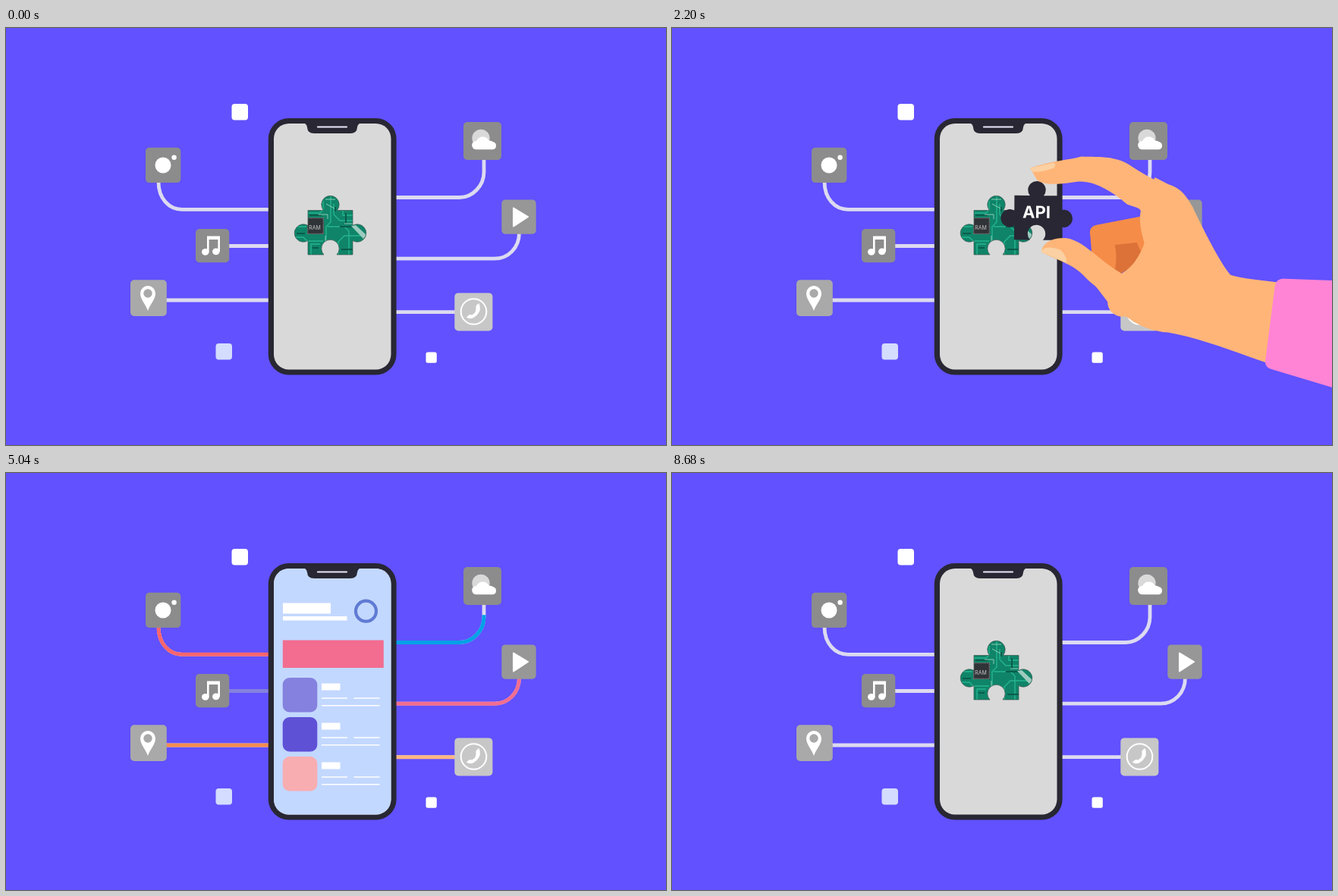
Recreate the animation shown at these times as an HTML page. Size 870 by 550 pixels, loop 8.72 s.

```html
<!DOCTYPE html>
<html lang="en">
<head>
<meta charset="utf-8">
<title>Phone with API piece</title>
<style>
html, body { margin: 0; width: 100%; height: 100%; overflow: hidden; background: #6151ff; }
svg { display: block; width: 870px; height: 550px; }
text { font-family: Inter, "Liberation Sans", sans-serif; text-anchor: middle; }
</style>
</head>
<body>
<svg viewBox="0 0 870 550">
  <defs>
    <path id="shape" d="M398 240.5H418.5A11.7 11.7 0 1 1 436.5 240.5H457V260.5A11.7 11.7 0 1 1 457 280.5V299H436A11.7 11.7 0 1 0 419 299H398V280.5A11.7 11.7 0 1 1 398 260.5Z"/>
    <clipPath id="shapeClip"><use href="#shape"/></clipPath>
    <clipPath id="screenClip"><rect x="353" y="126" width="154.5" height="324.5" rx="20"/></clipPath>
  </defs>
  <rect width="870" height="550" fill="#6151ff"/>
  <rect x="297.5" y="100" width="21.5" height="21.5" rx="4" fill="#fff"/>
  <rect x="276.5" y="416" width="21.5" height="21.5" rx="4" fill="#d4dcff"/>
  <rect x="553.5" y="427.5" width="14.3" height="14.3" rx="2.5" fill="#fff"/>
  <g id="links" fill="none"></g>
  <g id="icons"></g>
  <g fill="#fff">
    <circle cx="207" cy="181" r="10.5"/><circle cx="221.6" cy="170.8" r="3.2"/>
    <ellipse cx="262.8" cy="295.3" rx="4.8" ry="4.4"/><ellipse cx="276.8" cy="294.8" rx="4.8" ry="4.4"/>
    <path d="M265 295V274.5H282V295H279.4V279H267.6V295Z"/>
    <path fill-rule="evenodd" d="M187 373C184 364 177 358 177 350A10 10 0 0 1 197 350C197 358 190 364 187 373ZM181.3 350a5.7 5.7 0 0 0 11.4 0a5.7 5.7 0 0 0-11.4 0Z"/>
    <circle cx="626" cy="145.3" r="11.6" opacity=".67"/>
    <path d="M619.5 160.3a5.7 5.7 0 0 1 .7-11.4a9 9 0 0 1 16.3-.3a7 7 0 0 1 5.3 1.5a5.2 5.2 0 0 1 0 10.2Z"/>
    <path d="M669 237.5L688 249L669 261.5Z" stroke="#fff" stroke-width="2" stroke-linejoin="round"/>
    <circle cx="616.5" cy="374" r="16.8" fill="none" stroke="#fff" stroke-width="2"/>
    <path d="M607 381.5Q611 376.5 614 378.5Q620 376 619.5 369Q618.5 366 623.5 363Q627.5 372 620.5 379Q613 386 607 381.5Z"/>
  </g>

  <rect x="345.8" y="119" width="168.8" height="338.5" rx="27" fill="#282733"/>
  <rect x="353" y="126" width="154.5" height="324.5" rx="20" fill="#d9d9d9"/>

  <g id="board">
    <g clip-path="url(#shapeClip)" fill="none">
      <rect x="378" y="220" width="100" height="82" fill="#0f8468"/>
      <path stroke="#25b58f" stroke-width="1.4" d="M398 244H414L418 240V228M422 300V262L428 256V222M432 232V246L440 254H458M380 276H392L397 281H418M402 299V285H414M424 262H446L452 268V299M438 299V282L446 274H475M444 240V247H458M384 262H396"/>
      <path stroke="#0a5c4b" stroke-width="2" d="M400 247H416M434 242V236M440 262H456M404 290H412M442 292H458M383 271H394M448 244V258"/>
      <path stroke="#a9ddca" stroke-width=".8" d="M421 226H434M422 232L433 238M412 246H424V252M421 274V284M446 258H457"/>
      <path fill="#9dcbbf" d="M455 261L461 260L475 273L471 278Z"/>
      <rect x="397" y="250" width="22" height="22" fill="#303337"/>
      <rect x="397.7" y="250.7" width="20.6" height="20.6" stroke="#999" stroke-width="1.3" stroke-dasharray="1 1.2"/>
      <rect x="399.5" y="252.5" width="17" height="17" fill="#303337"/>
      <text x="407" y="266" font-size="7" textLength="" fill="#c5c5c5">RAM</text>
    </g>
    <use href="#shape" fill="none" stroke="#3c5550" stroke-width=".7"/>
  </g>

  <g id="ui" clip-path="url(#screenClip)">
    <rect x="353" y="126" width="155" height="325" fill="#c3d8ff"/>
    <rect id="title" x="365" y="171.5" height="14" fill="#fff"/>
    <rect id="subtitle" x="365" y="189" height="5.5" fill="#fff"/>
    <circle id="ring" cx="474.5" cy="182.2" r="13.5" fill="none" stroke="#607bd3" stroke-width="4.2" pathLength="1" transform="rotate(-90 474.5 182.2)"/>
    <rect id="banner" y="220.5" height="36.5" fill="#f26d90"/>
    <g id="rows"></g>
  </g>
  <path d="M392 125H468Q463.500 126.500 463 131Q462.500 139 454 139H406Q397.500 139 397 131Q396.500 126.500 392 125Z" fill="#282733"/>
  <path d="M411 130.5H449" stroke="#e9e8fb" stroke-width="2.2" stroke-linecap="round"/>

  <g id="piece">
    <use href="#shape" fill="#282733"/>
    <text x="427.3" y="270" font-size="22" font-weight="700" fill="#fff">API</text>
  </g>

  <g id="hand" fill="#ffb578">
    <path fill="#f58c48" d="M502 325Q500 314 511 312L580 301V345L537 379L504 364Z"/>
    <path fill="#dc7238" d="M534 339L563 337L568 349L556 369L537 379L533 372Q537 355 534 339Z"/>
    <path d="M572 288C566 304 568 318 573 338C566 358 552 374 537 379L505 390L522 414C521 424 530 434 541 434C548 430 558 452 600 457C640 465 690 487 735 504L752 397C728 392 705 391 685 384C672 368 650 320 638 292C628 272 618 265 608 262L590 252Z"/>
    <path id="index"/>
    <path id="thumb"/>
    <path id="indexNail" fill="#fbd0a2"/>
    <path id="thumbNail" fill="#fbd0a2"/>
    <path fill="#ff84d5" d="M743 401Q745 390 757 391.500L970 407V590L737 511Q725 508 727 498Z"/>
  </g>
</svg>
<script>
const LOOP = 8720;
const $ = id => document.getElementById(id);
const clamp = v => Math.min(1, Math.max(0, v));
const linear = (t, a, b) => clamp((t - a) / (b - a));
const ease = (t, a, b) => { const u = linear(t, a, b); return u * u * (3 - 2 * u); };
const lerp = (a, b, s) => a + (b - a) * s;
const set = (el, attrs) => { for (const k in attrs) el.setAttribute(k, attrs[k]); };
const add = (parent, tag, attrs) => {
  const el = document.createElementNS("http://www.w3.org/2000/svg", tag);
  set(el, attrs);
  return parent.appendChild(el);
};

// Blends two paths that share the same commands.
const mix = (from, to, s) => {
  const goal = to.match(/[\d.]+/g);
  let i = 0;
  return from.replace(/[\d.]+/g, n => lerp(+n, +goal[i++], s).toFixed(2));
};

// Finger poses: closed around the piece, then open.
const poses = {
  index: [
    "M426 234C450 226 477 225 494 221C520 223 541 221 562 238C580 250 597 261 610 263L600 310L570 302C572 290 565 292 552 286C535 270 510 253 489 254C465 257 441 258 434 249Z",
    "M447 196C465 196 490 200 516 200C540 206 563 219 580 235C592 246 606 250 612 263L600 310L568 308C572 298 574 289 568 286C548 272 530 250 502 230C482 229 462 222 453 217Z"],
  thumb: [
    "M437 343C441 331 456 326 471 328C493 332 512 358 540 376L560 400L537 430L522 414C518 400 502 390 495 382C480 362 455 356 437 345Z",
    "M429 364C434 350 447 344 463 346C488 351 508 366 537 379L560 400L537 430L522 414C510 402 495 400 478 391C462 379 440 374 429 366Z"],
  indexNail: [
    "M426 234L457 228Q462 231 457 235Q442 240 429 239Z",
    "M447 196L478 198Q482 202 478 206Q462 206 449 203Z"],
  thumbNail: [
    "M437 343Q444 336 462 343Q470 350 470 361Q454 353 437 345Z",
    "M429 364Q437 355 458 362Q464 367 459 376Q445 373 429 367Z"]
};

// Paths run from the phone outwards; draw and wipe are start times and durations.
const apps = [
  { d: "M346 239.300H232C215 239.300 201 225 201 203", box: [184, 157.8, 46.3], grey: "#8c8c8c", color: "#ff5964", line: "#f9656c", draw: [4440, 560], wipe: 7205 },
  { d: "M346 287.500H293", box: [250, 265, 44.3], grey: "#8c8c8c", color: "#8581de", line: "#8581de", draw: [4500, 400], wipe: 7215 },
  { d: "M346 359H211", box: [164, 332.2, 47.8], grey: "#a9a9a9", color: "#f68f48", line: "#f58c4e", draw: [4460, 500], wipe: 7067 },
  { d: "M514 223.500H598C615 223.500 630 208 630 190V173", box: [603, 124, 50], grey: "#8c8c8c", color: "#00b9ff", line: "#00a1e6", draw: [4500, 667], wipe: 7127 },
  { d: "M514 304.200H644C662 304.200 676.500 290 676.500 270", box: [653.3, 226.4, 45.4], grey: "#979797", color: "#f26d90", line: "#f26d90", draw: [4440, 580], wipe: 7115 },
  { d: "M514 374.700H592", box: [591.3, 349.4, 50.1], grey: "#c7c7c7", color: "#ffb777", line: "#fcb783", draw: [4500, 450], wipe: 7113 }
];

for (const app of apps) {
  const [x, y, size] = app.box;
  const square = fill => add($("icons"), "rect", { x, y, width: size, height: size, rx: 5, fill });
  add($("links"), "path", { d: app.d, stroke: "#dcdaf0", "stroke-width": 4.8 });
  app.link = add($("links"), "path", { d: app.d, stroke: app.line, "stroke-width": 4.9, pathLength: 1 });
  square(app.grey);
  app.tint = square(app.color);
}

const rows = ["#8581de", "#5f51d6", "#f8adb1"].map(fill => {
  const row = add($("rows"), "g", {});
  add(row, "rect", { x: 364.7, y: 270, width: 45.6, height: 45.4, rx: 9, fill });
  add(row, "path", { d: "M416 277.500H440.500V286.500H416Z", fill: "#fff" });
  add(row, "path", { d: "M416 297H450M458.500 297H492.500M416 306.800H492.500", stroke: "#fff", "stroke-width": 1.6 });
  return row;
});

function drawHand(t) {
  const enter = (1 - linear(t, 0, 1200)) ** 2;
  const carry = ease(t, 1233, 2500);
  const open = ease(t, 2600, 3150);
  const leave = 390 * ease(t, 3120, 3850);
  const x = lerp(378 + 115 * enter, 0, carry);
  const y = lerp(-138 - 34 * enter, 0, carry);
  const turn = lerp(1, -2.5, carry);

  set($("piece"), {
    transform: `translate(${x} ${y}) rotate(${turn + 2.5} 427.5 265)`,
    opacity: 1 - linear(t, 3780, 3980)
  });
  set($("hand"), {
    transform: `translate(${x - 5 * (1 - open)} ${y - 30 + 17 * open + leave}) rotate(${turn * (1 - open)} 432.5 295)`,
    visibility: t < 3860 ? "visible" : "hidden"
  });
  for (const id in poses) set($(id), { d: mix(...poses[id], open) });
}

function drawScreen(t) {
  const grow = ease(t, 4130, 4700);
  set($("board"), { opacity: t < 2500 ? 1 : linear(t, 8150, 8440) });
  set($("ui"), { opacity: linear(t, 4050, 4300) * (1 - linear(t, 7820, 8200)) });
  set($("title"), { width: 63 * ease(t, 3900, 4320) });
  set($("subtitle"), { width: 84.5 * ease(t, 4230, 4600) });
  set($("ring"), { "stroke-dasharray": `${ease(t, 3900, 4370)} 2` });
  set($("banner"), { x: 431.3 - 66.5 * grow, width: 133 * grow });
  rows.forEach((row, i) => {
    const start = 3950 + 150 * i;
    set(row, { transform: `translate(0 ${52 * i + 180 * (1 - ease(t, start, start + 700))})` });
  });
}

function drawApps(t) {
  apps.forEach((app, i) => {
    const [start, span] = app.draw;
    const head = ease(t, start, start + span);
    const tail = ease(t, app.wipe, app.wipe + 350);
    const on = 5200 + 110 * i, off = 7420 + 50 * i;
    set(app.link, {
      "stroke-dasharray": `0 ${tail} ${head - tail} 2`,
      visibility: head > tail ? "visible" : "hidden"
    });
    set(app.tint, { opacity: linear(t, on, on + 250) * (1 - linear(t, off, off + 250)) });
  });
}

function render(now) {
  const t = now % LOOP;
  drawHand(t);
  drawScreen(t);
  drawApps(t);
}

const origin = performance.now();
const tick = () => {
  render(performance.now() - origin);
  requestAnimationFrame(tick);
};
tick();
</script>
</body>
</html>
```
